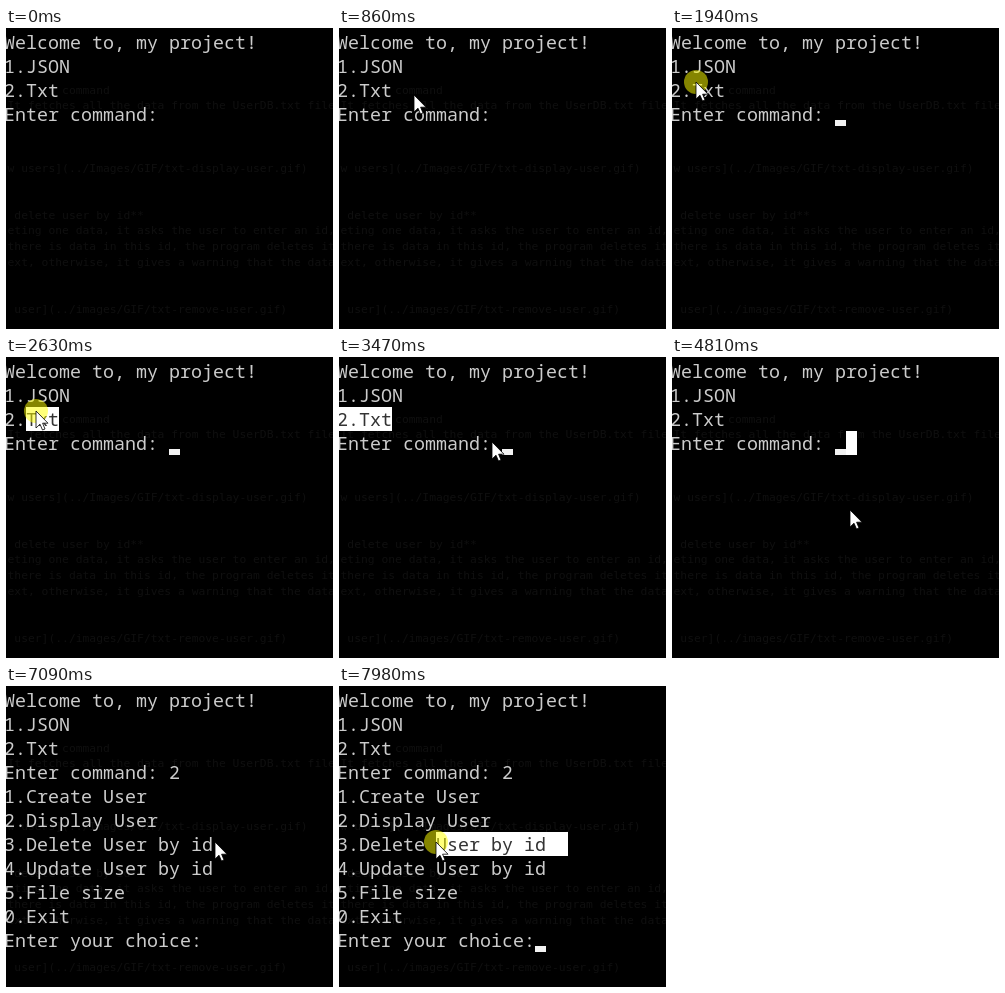
These frames come from a looping animation (327 px wide and 301 px high, 8000 ms). An HTML page:

```html
<!DOCTYPE html>
<html lang="en">
<head>
<meta charset="utf-8">
<title>Console menu</title>
<style>
html, body { margin: 0; width: 100%; height: 100%; overflow: hidden; background: #000; }
#stage { position: relative; width: 327px; height: 301px; overflow: hidden; }
#stage > * { position: absolute; margin: 0; }
#behind { left: 1.5px; top: 54.5px; font: 11.34px/15.65px "DejaVu Sans Mono", monospace; color: #0f0f0f; }
#text, #sel { left: -2px; top: 2px; white-space: pre; font: 500 18.333px/24px "Noto Sans Mono", monospace; color: #ccc; }
#sel { background: #fff; color: #333; height: 24px; overflow: hidden; }
#caret { width: 11px; height: 6px; background: #f2f2f2; }
#ring { width: 24px; height: 24px; margin: -12px; border-radius: 50%; background: #ff0; opacity: .52; }
#mouse { overflow: visible; }
</style>
</head>
<body>
<div id="stage">
<pre id="behind">
        command
It fetches all the data from the UserDB.txt file



w users](../Images/GIF/txt-display-user.gif)


 delete user by id**
eting one data, it asks the user to enter an id,
there is data in this id, the program deletes it
ext, otherwise, it gives a warning that the data


 user](../images/GIF/txt-remove-user.gif)
</pre>
<pre id="text"></pre>
<div id="caret"></div>
<div id="sel"></div>
<div id="ring" style="margin:-12px"></div>
<svg id="mouse" width="13" height="20"><path d="M0 0V17L4 13.2L6.5 19L9 18L6.6 12.2H12Z" fill="#fff" stroke="#000" stroke-width=".8"/></svg>
</div>
<script>
const LOOP = 8000, CELL = 11, ROW = 24, LEFT = -2, TOP = 2, BLINK = 530;
const FOCUS = 1870, CLEAR = 5470, TYPE = 5600, MENU = 5860, DRAG = 7630;
const [text, caret, sel, ring, mouse] =
  ["text", "caret", "sel", "ring", "mouse"].map(id => document.getElementById(id));

const intro = ["Welcome to, my project!", "1.JSON", "2.Txt", "Enter command: "];
const menu = ["1.Create User", "2.Display User", "3.Delete User by id",
  "4.Update User by id", "5.File size", "0.Exit", "Enter your choice:"];

// Pointer moves: start, end, x, y reached
const moves = [
  [240, 450, 132, 88], [650, 860, 75, 67], [1260, FOCUS, 24, 54],
  [2080, 2220, 51, 54], [2420, 2980, -4, 54],
  [3330, 3470, 153, 85], [3470, 3740, 178, 80], [4530, 4810, 178, 153],
  [5790, 5920, 151, 157], [6600, 7180, 219, 156], [DRAG, 7970, 97, 156]
];
const presses = [[FOCUS, 2010], [2220, 3190], [4000, 4260], [DRAG, LOOP]];

const show = (el, on) => el.style.display = on ? "block" : "none";
const column = x => Math.max(0, Math.floor((x - LEFT) / CELL));

function place(el, x, y) {
  el.style.left = x + "px";
  el.style.top = y + "px";
}

function pointer(t) {
  let x = 242, y = 218;
  for (const [start, end, toX, toY] of moves) {
    const f = Math.min(1, Math.max(0, (t - start) / (end - start)));
    x += (toX - x) * f;
    y += (toY - y) * f;
  }
  return [Math.round(x), Math.round(y)];
}

// The caret blinks once focused, rests while typing and starts again in the menu
function caretOn(t) {
  const beat = Math.floor((t - 2410) / BLINK);
  if (t >= MENU) return beat !== 8;
  return t >= FOCUS && t < CLEAR && (beat < 0 || beat % 2 === 0);
}

// Selected cells: row, first column, end column
function selection(t, x) {
  if (t >= 2420 && t < 4000) return [2, t < 2980 ? column(x) : 0, 5];
  if (t >= 4000 && t < CLEAR) return [3, 16, 17];
  if (t >= DRAG) return [6, column(x), 21];
}

function draw(t) {
  const [x, y] = pointer(t);
  const lines = t < MENU ? [...intro] : [...intro, ...menu];
  if (t >= TYPE) lines[3] += "2";
  text.textContent = lines.join("\n");

  const row = lines.length - 1;
  const end = t < MENU ? intro[3].length : lines[row].length;
  show(caret, caretOn(t));
  place(caret, LEFT + end * CELL, TOP + row * ROW + 18);

  const cells = selection(t, x);
  show(sel, cells);
  if (cells) {
    const [r, a, b] = cells;
    sel.textContent = lines[r].slice(a, b);
    sel.style.width = (b - a) * CELL + "px";
    place(sel, LEFT + a * CELL, TOP + r * ROW);
  }

  show(ring, presses.some(([down, up]) => t >= down && t < up));
  place(ring, x, y);
  show(mouse, t >= 240);
  place(mouse, x, y);
}

const start = performance.now();
function tick() {
  draw((performance.now() - start) % LOOP);
  requestAnimationFrame(tick);
}
tick();
</script>
</body>
</html>
```
